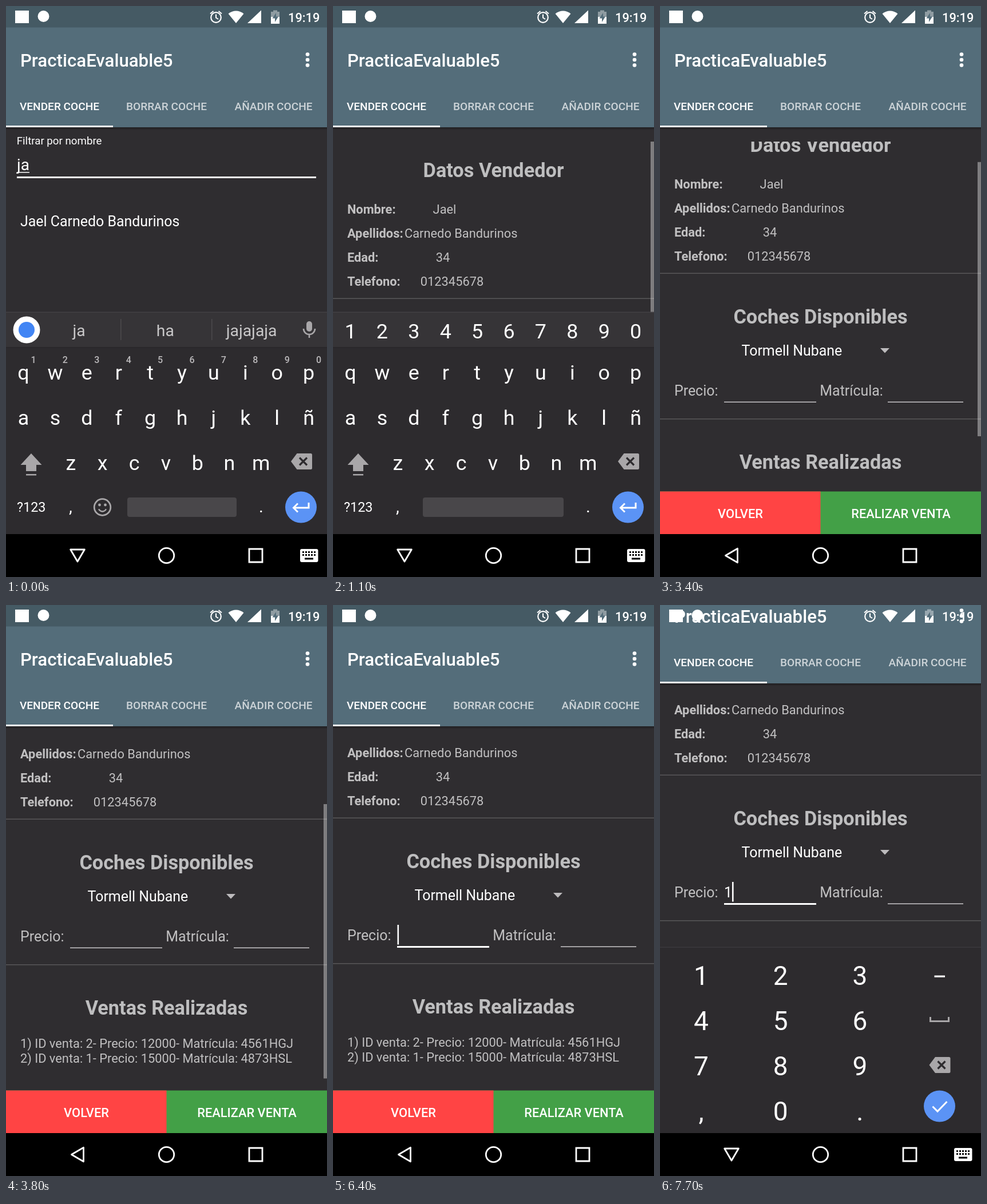
Recreate the animation shown at these times as an HTML page with a canvas. Size 561 px wide and 998 px high, loop 8000 ms.

```html
<!DOCTYPE html>
<html lang="es">
<head>
<meta charset="utf-8">
<title>PracticaEvaluable5</title>
<style>
  html, body { margin: 0; width: 100%; height: 100%; overflow: hidden; background: #000; }
  canvas { display: block; }
</style>
</head>
<body>
<canvas id="stage" width="561" height="998"></canvas>
<script>
const W = 561, H = 998, LOOP = 8000, STEP = 100;
const DENSITY = 3, DEVICE_SCALE = W / 1080;
const DIM = 'rgba(255,255,255,.7)', PANEL = '#2f2d30', KEYS = '#2d2b2e', ICON = '#a9a7a9', BLUE = '#5b93f5';
const MARGIN = 24.93;
const PERSON = { first: 'Jael', last: 'Carnedo Bandurinos', phone: '012345678' };
const stage = document.getElementById('stage').getContext('2d');
let c = stage;

const clamp = v => Math.max(0, Math.min(1, v));
const ramp = (t, start, length) => clamp((t - start) / length);
const easeOut = (x, power) => 1 - (1 - x) ** power;

function at(x, y, draw) {
  c.save();
  c.translate(x, y);
  draw();
  c.restore();
}

// Sizes are in sp and laid out in device pixels; y is the centre of the capital letters.
function text(str, x, y, sp, color = '#fff', weight = 400, align = 'left') {
  at(x, y, () => {
    const size = sp * DENSITY;
    c.scale(DEVICE_SCALE, DEVICE_SCALE);
    c.font = `${weight} ${size}px Roboto, sans-serif`;
    c.textAlign = align;
    c.fillStyle = color;
    c.fillText(str, 0, size * .356);
  });
}
const centered = (str, x, y, sp, color, weight) => text(str, x, y, sp, color, weight, 'center');

function box(x, y, w, h, color, radius = 0) {
  c.fillStyle = color;
  c.beginPath();
  c.roundRect(x, y, w, h, radius);
  c.fill();
}
function disc(x, y, r, color) {
  c.fillStyle = color;
  c.beginPath();
  c.arc(x, y, r, 0, 7);
  c.fill();
}
function ring(x, y, r, color, width, from = 0, to = 7) {
  c.strokeStyle = color;
  c.lineWidth = width;
  c.beginPath();
  c.arc(x, y, r, from, to);
  c.stroke();
}
function fill(d, color) {
  c.fillStyle = color;
  c.fill(new Path2D(d));
}
function line(d, color, width, join = 'miter') {
  c.strokeStyle = color;
  c.lineWidth = width;
  c.lineJoin = join;
  c.stroke(new Path2D(d));
}

// ---- keyboards, drawn once ----
function layer(draw) {
  const canvas = document.createElement('canvas');
  canvas.width = W;
  canvas.height = H;
  c = canvas.getContext('2d');
  draw();
  c = stage;
  return canvas;
}

function backspace(x, y) {
  at(x, y, () => {
    fill('M-18.5 0L-8 -14H16Q18.5 -14 18.5 -11.5V11.5Q18.5 14 16 14H-8Z', ICON);
    line('M-3.5 -6.5L9.5 6.5M9.5 -6.5L-3.5 6.5', KEYS, 3.2);
  });
}

function letterBoard(numbersOnTop) {
  box(0, 535, W, 388, KEYS);
  box(0, 535, W, 62, '#363437');
  box(0, 534.5, W, 1.5, '#434144');
  box(0, 596, W, 1.5, '#29272a');

  const row = (keys, x, y) => [...keys].forEach((key, i) => centered(key, x + i * 55.4, y, 23));
  if (numbersOnTop) {
    row('1234567890', 30.5, 568);
  } else {
    disc(36, 566, 23.5, '#fff');
    disc(36, 566, 14, '#4285f4');
    ['ja', 'ha', 'jajajaja'].forEach((word, i) => centered(word, 127.5 + i * 150.8, 567, 18.2, '#c8c7c8'));
    for (const x of [200, 359]) box(x, 547, 1.5, 37, '#4c4a4d');
    box(525, 551, 10, 18, ICON, 5);
    line('M520 564a10 10 0 0 0 20 0M530 574V580', ICON, 2.6);
    [...'1234567890'].forEach((n, i) => centered(n, 48 + i * 55.4, 618, 10.3, '#bbb9bb', 500));
  }
  row('qwertyuiop', 30.5, 640);
  row('asdfghjklñ', 30.5, 719);
  row('zxcvbnm', 113.3, 798);

  fill('M44 782L62.5 802H53V813H35V802H25.5Z', ICON);
  box(35, 818, 18, 2.5, ICON);
  backspace(516.5, 796);

  text('?123', 19, 876, 15);
  centered(',', 113, 874, 19);
  centered('.', 446, 874, 19);
  if (!numbersOnTop) {
    ring(168.5, 876, 14.3, ICON, 2.8);
    disc(163.5, 872, 2.4, ICON);
    disc(173.5, 872, 2.4, ICON);
    ring(168.5, 876.5, 7, ICON, 2.4, .4, 2.74);
  }
  const spaceX = numbersOnTop ? 157 : 212;
  box(spaceX, 859, 403 - spaceX, 34, '#49474a', 4);
  disc(515.5, 876, 27.5, BLUE);
  line('M529 868V877H503M510 869.5L502.5 877L510 884.5', '#fff', 3);
}

function numberBoard() {
  box(0, 598, W, 325, KEYS);
  box(0, 597.5, W, 1.5, '#3b393c');
  ['123', '456', '789', ',0.'].forEach((keys, r) =>
    [...keys].forEach((key, i) => centered(key, 72 + i * 138.7, 648 + r * 79, 29.5)));
  box(479.5, 647.5, 18.5, 3.2, '#fff');
  line('M472.5 720V727.5H504.5V720', ICON, 3);
  backspace(489, 804);
  disc(488.5, 876, 27.5, BLUE);
  line('M476.5 876.5L485 885L501.5 868', '#fff', 3);
}

const boards = {
  suggestions: layer(() => letterBoard(false)),
  letters: layer(() => letterBoard(true)),
  numbers: layer(numberBoard)
};

// ---- app window ----
function header() {
  const shadow = c.createLinearGradient(0, 212, 0, 217);
  shadow.addColorStop(0, 'rgba(0,0,0,.35)');
  shadow.addColorStop(1, 'rgba(0,0,0,0)');
  box(0, 212, W, 5, shadow);
  box(0, 0, W, 212, '#546d7a');
  box(0, 0, W, 37.5, '#455a64');
  text('PracticaEvaluable5', MARGIN, 95.3, 20, '#fff', 500);
  for (const y of [84.5, 94, 103.5]) disc(527, y, 3.3, '#fff');
  ['VENDER COCHE', 'BORRAR COCHE', 'AÑADIR COCHE'].forEach((tab, i) =>
    centered(tab, 93.5 + i * 187, 175, 12.25, i ? DIM : '#fff', 500));
  box(0, 209, 187, 3, '#fff');
}

function filterList() {
  text('Filtrar por nombre', 18.7, 235.5, 12);
  text('ja', 19, 277.5, 18);
  box(19, 290, 22, 1.5, '#fff');
  box(19, 298, 523, 3, '#fff');
  text(`${PERSON.first} ${PERSON.last}`, MARGIN, 376, 16);
}

function saleForm({ scroll, barAlpha, focused, price, caret }) {
  c.save();
  c.beginPath();
  c.rect(0, 237, W, 592.5);
  c.clip();
  c.translate(0, -scroll);

  const heading = (str, y) => centered(str, 280.5, y, 22, 'rgba(255,255,255,.69)', 700);
  const divider = y => box(0, y, W, 1.5, 'rgba(255,255,255,.2)');
  heading('Datos Vendedor', 287);
  ['Nombre:', 'Apellidos:', 'Edad:', 'Telefono:'].forEach((label, i) =>
    text(label, MARGIN, 355 + i * 42, 14, DIM, 700));
  centered(PERSON.first, 195, 355, 14, DIM);
  text(PERSON.last, 125, 397, 14, DIM);
  centered('34', 192, 439, 14, DIM);
  centered(PERSON.phone, 208, 481, 14, DIM);
  divider(510.5);

  heading('Coches Disponibles', 587);
  text('Tormell Nubane', 142.5, 646, 16);
  fill('M385 642H401L393 650.5Z', '#bdbbbd');
  text('Precio:', MARGIN, 716.5, 16, DIM);
  text('Matrícula:', 279.3, 716.5, 16, DIM);
  if (focused) box(112, 735, 161, 3, '#fff');
  else box(112, 735.5, 161, 1.5, '#c9c7c9');
  box(398, 735.5, 132, 1.5, '#c9c7c9');
  text(price, 112, 716.5, 16);
  if (caret) box(price ? 126 : 112.5, 698, 2.6, 34.5, '#fff');
  divider(765);

  heading('Ventas Realizadas', 840.5);
  text('1) ID venta: 2- Precio: 12000- Matrícula: 4561HGJ', MARGIN, 903, 14, DIM);
  text('2) ID venta: 1- Precio: 15000- Matrícula: 4873HSL', MARGIN, 928.8, 14, DIM);
  c.restore();

  const view = 592, content = view + 139;
  box(555, 237 + scroll * view / content, 6, view * view / content, `rgba(255,255,255,${.38 * barAlpha})`);

  box(0, 848.5, W, 74.5, '#43a047');
  box(0, 848.5, W / 2, 74.5, '#ff4444');
  centered('VOLVER', 140.5, 887, 14, '#fff', 500);
  centered('REALIZAR VENTA', 421, 887, 14, '#fff', 500);
}

// ---- system bars ----
function statusIcons() {
  box(16, 8, 24, 22, '#fff');
  disc(65.5, 18, 10, '#fff');
  ring(367, 20, 8.8, '#fff', 2.2);
  line('M367 14.5V20.5L371 23M357 13.5L362.5 9M377 13.5L371.5 9', '#fff', 2);
  fill('M388.5 13.5Q402 3.5 415.5 13.5L402 30Z', '#fff');
  fill('M446 7.5V30H422Z', '#fff');
  fill('M463 10H467V7.5H474V10H478V19H463Z', 'rgba(255,255,255,.4)');
  box(463, 19, 15, 12, '#fff');
  fill('M472 12L465.5 21.5H470V28L476 18.5H472Z', '#546d7a');
  text('19:19', 493, 20, 14, '#fff', 500);
}

function navIcons(backTurn, keyboardIcon) {
  at(125, 960.5, () => {
    c.rotate(backTurn * Math.PI / 2);
    line('M-12.3 -10.5H12.3L0 10.5Z', '#fff', 2.8, 'round');
  });
  ring(280.5, 960.5, 13.2, '#fff', 2.8);
  line('M425 949H448V972H425Z', '#fff', 2.8);
  if (!keyboardIcon) return;
  box(514, 949, 31.5, 23, '#fff', 3);
  for (let i = 0; i < 10; i++) box(518 + i % 5 * 5, 953 + Math.floor(i / 5) * 5, 3, 3, '#000');
  box(522, 964.5, 15, 3, '#000');
}

function barAlphaAt(t) {
  if (t < 2400) return 1 - ramp(t, 1900, 400);
  return t < 3400 ? 0 : 1 - ramp(t, 4200, 600);
}

function render(t) {
  const closing = ramp(t, 1900, 500);
  const opening = ramp(t, 6400, 333);
  const shown = t < 6400 ? 1 - closing : opening;
  const pan = Math.floor(75 * easeOut(ramp(t, 6400, 320), 4));
  const focused = t >= 6400;

  box(0, 0, W, H, '#000');
  at(0, -pan, () => {
    box(0, 0, W, 923, PANEL);
    if (t < 600) filterList();
    else saleForm({
      scroll: Math.round(139 * easeOut(ramp(t, 3300, 570), 2)),
      barAlpha: barAlphaAt(t),
      focused,
      price: t >= 7700 ? '1' : '',
      caret: focused && !(t >= 7400 && t < 7700)
    });
    header();
  });

  const board = t >= 6400 ? boards.numbers : t < 700 ? boards.suggestions : boards.letters;
  c.globalAlpha = shown;
  c.drawImage(board, 0, 157 * (1 - shown));
  c.globalAlpha = 1;

  statusIcons();
  navIcons(focused ? 1 - clamp(opening * 2) : closing, focused ? opening > 0 : closing === 0);
}

const start = performance.now();
function tick() {
  const t = (performance.now() - start) % LOOP;
  render(Math.floor(t / STEP) * STEP);
  requestAnimationFrame(tick);
}
tick();
</script>
</body>
</html>
```
